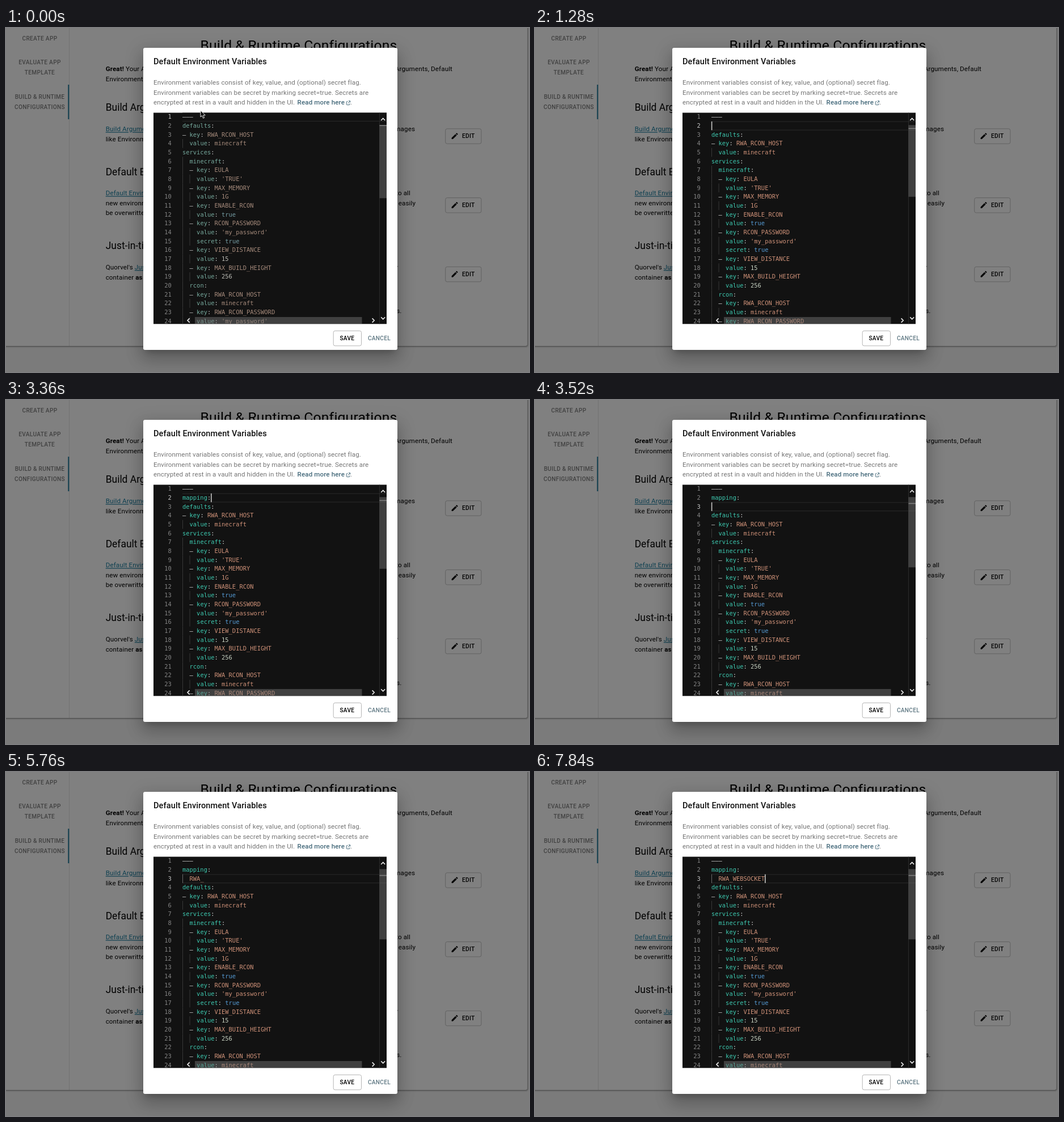
These frames come from a looping animation (922 px wide and 607 px high, 8000 ms). An HTML page:

```html
<!DOCTYPE html>
<html lang="en">
<head>
<meta charset="utf-8">
<title>Environment variables editor</title>
<style>
html, body { margin: 0; width: 100%; height: 100%; overflow: hidden; background: #7b7b7b; }
svg { display: block; width: 922px; height: 607px; }
text { font-family: Roboto, sans-serif; white-space: pre; }
.body { font-size: 11.62px; letter-spacing: .00938em; }
.btn { font-size: 10.17px; font-weight: 500; letter-spacing: .02857em; }
.h4 { font-size: 24.7px; letter-spacing: .00735em; }
.h5 { font-size: 17.43px; }
.h6 { font-size: 14.52px; font-weight: 500; letter-spacing: .0075em; }
.link { fill: #0c3f50; text-decoration: underline; }
.bold { font-weight: 700; }
.code text { font-family: "DejaVu Sans Mono", monospace; font-size: 10.43px; }
.mid { text-anchor: middle; }
.end { text-anchor: end; }
.plain { fill: #d4d4d4; } .key { fill: #3dc9b0; } .str { fill: #ce9178; }
.bool { fill: #569cd6; } .num { fill: #c8d2c2; }
.dim .plain { fill: #c6c6c6; } .dim .key { fill: #76a99d; } .dim .str { fill: #a58a7b; }
.dim .bool { fill: #769fa6; } .dim .num { fill: #bcbcb6; }
.shade rect { fill: #000; }
</style>
</head>
<body>
<svg viewBox="0 0 922 607">
  <defs>
    <clipPath id="pane"><rect x="260" y="149.4" width="411" height="372.8"/></clipPath>
    <filter id="near" x="-20%" y="-20%" width="140%" height="140%"><feGaussianBlur stdDeviation="5.4"/></filter>
    <filter id="far" x="-20%" y="-20%" width="140%" height="140%"><feGaussianBlur stdDeviation="15"/></filter>
    <filter id="thin" x="-5%" y="-5%" width="110%" height="110%"><feGaussianBlur stdDeviation="1"/></filter>
    <path id="pencil" transform="scale(.605)" d="M3 17.25V21h3.75L17.81 9.94l-3.75-3.75L3 17.25zM20.71 7.04a1 1 0 000-1.41l-2.34-2.34a1 1 0 00-1.41 0l-1.83 1.83 3.75 3.75 1.83-1.83z"/>
  </defs>
  <rect width="922" height="607" fill="#7b7b7b"/>
  <rect x="-9" y="-9" width="929" height="571.5" rx="3" fill="#4c4c4c" filter="url(#thin)"/>
  <rect x="-9" y="-9" width="928" height="570" rx="3" fill="#808080"/>
  <rect x="111" width="1" height="561" fill="#727272"/>
  <rect x="109.3" y="100" width="2" height="61" fill="#123f4f"/>
  <g id="page"></g>

  <g class="shade">
    <rect x="247" y="48" width="438" height="523" opacity=".2" filter="url(#near)"/>
    <rect x="240" y="50" width="452" height="537" opacity=".14" filter="url(#far)"/>
    <rect x="236" y="36" width="460" height="545" opacity=".12" filter="url(#far)"/>
  </g>
  <rect x="242" y="35" width="448" height="533" rx="3" fill="#fff"/>
  <g id="dialog"></g>
  <g fill="none" stroke="#44697a" stroke-width="1">
    <path d="M602.6 129.6H601.2a1 1 0 0 0-1 1V134.6a1 1 0 0 0 1 1h3.8a1 1 0 0 0 1-1v-1.4"/>
    <path d="M602.6 133.2l3.8-4M604 128.7h2.7v2.7"/>
  </g>
  <rect x="577.2" y="534.4" width="49.3" height="26.4" rx="3" fill="none" stroke="#b5b5b5"/>

  <g clip-path="url(#pane)">
    <rect x="260" y="149" width="411" height="374" fill="#121212"/>
    <g id="current" fill="#2a2a2a">
      <rect x="311" width="360" height="1"/><rect x="311" y="14.9" width="360" height="1"/>
    </g>
    <g id="code" class="code"></g>
    <rect id="caret" width="1.6" height="15.4" fill="#c8c8c6"/>
    <rect x="658" y="149" width="1" height="374" fill="#2b2b2b"/>
    <rect id="mark" x="658.5" width="13" height="1.5" fill="#8a8a8a"/>
    <g fill="#797979" opacity=".45">
      <rect id="slider" x="658.5" y="171.3" width="12.5"/>
      <rect x="333" y="510" width="294.5" height="12.4"/>
    </g>
    <g fill="none" stroke="#eee" stroke-width="1.6">
      <path d="M661.2 163l3.5-3.6 3.5 3.6M661.2 510.2l3.5 3.6 3.5-3.6M323.6 512.4l-3.6 3.6 3.6 3.6M645.6 512.4l3.6 3.6-3.6 3.6"/>
    </g>
  </g>
  <path id="mouse" transform="translate(343 145.6)" fill="#000" stroke="#fff" stroke-width=".9"
    d="M0 0V11.4l2.6-2.4 2 4.6 2-.9-2-4.4h3.6z"/>
</svg>
<script>
const LOOP = 8000, LEFT = 311, TOP = 149, ROW = 15.67, CHAR = 6.28;
const $ = id => document.getElementById(id);
const span = (cls, s) => `<tspan class="${cls}">${s}</tspan>`;
const text = (cls, x, y, s, fill = '#000') => `<text class="${cls}" x="${x}" y="${y}" fill="${fill}">${s}</text>`;

function drawPage() {
  const nav = [['CREATE APP', 21.6], ['EVALUATE APP', 64], ['TEMPLATE', 82], ['BUILD &amp; RUNTIME', 124.6], ['CONFIGURATIONS', 142.6]];
  const left = [
    [76.2, span('bold', 'Great!') + ' Your App'], [93.7, 'Environment'],
    [182.4, span('link', 'Build Arguments')], [199.9, 'like Environment'],
    [295.4, span('link', 'Default Environ')], [312.9, 'new environments'], [330.3, 'be overwritten'],
    [426.2, "Quorvel's " + span('link', 'Just-in')], [443.7, 'container ' + span('bold', 'as')]
  ];
  const right = [[787, 76.2, 'Arguments, Default'], [721, 182.4, 'images'], [713, 295.4, 'to all'],
    [722, 312.9, 'easily'], [691, 426.2, 'y'], [697.5, 502.6, 's.']];
  const heads = [[146.2, 'Build Arguments'], [259.6, 'Default Env'], [389.6, 'Just-in-time']];
  const edits = [177.8, 299.6, 421.4];
  $('page').innerHTML =
    text('h4 mid', 516, 39, 'Build &amp; Runtime Configurations') +
    nav.map(([s, y]) => text('btn mid', 59.5, y, s, '#414141')).join('') +
    left.map(([y, s]) => text('body', 175.7, y, s)).join('') +
    right.map(([x, y, s]) => text('body end', x, y, s)).join('') +
    heads.map(([y, s]) => text('h5', 175.7, y, s)).join('') +
    edits.map(y => `<rect x="774.7" y="${y}" width="63.2" height="26.4" rx="3" fill="none" stroke="#626262"/>
      <use href="#pencil" transform="translate(783.8 ${y + 5.6})"/>` + text('btn', 804, y + 16.6, 'EDIT')).join('');
}

function drawDialog() {
  const grey = '#757575', teal = '#44697a';
  $('dialog').innerHTML =
    text('h6', 260, 63.6, 'Default Environment Variables', '#111') +
    text('body', 260, 100.2, 'Environment variables consist of key, value, and (optional) secret flag.', grey) +
    text('body', 260, 117.6, 'Environment variables can be secret by marking secret=true. Secrets are', grey) +
    text('body', 260, 135, 'encrypted at rest in a vault and hidden in the UI.', grey) +
    `<text class="body" x="513.6" y="135" fill="${teal}" font-weight="500">Read more here</text>` +
    text('body', 607.2, 135, '.', grey) +
    text('btn mid', 601.4, 551.4, 'SAVE') +
    text('btn mid', 658, 551.4, 'CANCEL', '#5f7883');
}

const item = (key, value, pad = '  ') => [`${pad}- key: ${key}`, `${pad}  value: ${value}`];
const yaml = [
  'defaults:', ...item('RWA_RCON_HOST', 'minecraft', ''),
  'services:', '  minecraft:',
  ...item('EULA', "'TRUE'"), ...item('MAX_MEMORY', '1G'), ...item('ENABLE_RCON', 'true'),
  ...item('RCON_PASSWORD', "'my_password'"), '    secret: true',
  ...item('VIEW_DISTANCE', '15'), ...item('MAX_BUILD_HEIGHT', '256'),
  '  rcon:', ...item('RWA_RCON_HOST', 'minecraft'), ...item('RWA_RCON_PASSWORD', "'my_password'")
];

// the editor shows hyphens as wide as a whole cell
const wide = s => s.replace(/-/g, '\u2013');

function paint(line) {
  if (line === '---') return span('plain', wide(line));
  const [, pad, key, value] = line.match(/^([\s-]*)(?:(\w+):)?\s*(.*)$/);
  const kind = /^(true|false)$/.test(value) ? 'bool' : /^\d+$/.test(value) ? 'num' : 'str';
  return span('plain', wide(pad)) + (key ? span('key', key) + span('plain', value ? ': ' : ':') : '') + (value ? span(kind, value) : '');
}

// [time, characters present] for each typed word
const word1 = [...Array(8)].map((_, i) => [1920 + 160 * i, i + 1]);
const word2 = [[4800, 1], [4960, 2], [5120, 3], [5280, 4], [6240, 5], [6400, 6], [6720, 7], [6880, 8],
  [7360, 9], [7520, 10], [7680, 12], [7840, 13]];
const typed = (s, keys, t) => s.slice(0, keys.reduce((n, [at, len]) => t >= at ? len : n, 0));

function stateAt(t) {
  const row = t < 1280 ? 0 : t < 3520 ? 1 : 2;
  const first = typed('mapping:', word1, t);
  const name = typed('RWA_WEBSOCKET', word2, t);
  const second = t < 4320 ? '' : '  ' + name;
  const hidden = t < 1280 || (t >= 1600 && t < 1920) || (t >= 4000 && t < 4320) || (t >= 5760 && t < 6240);
  const head = ['---', first, second].slice(0, row + 1);
  return { row, head, hidden, guide: name !== '', col: head[row].length, mouse: t < 160 };
}

function drawCode({ row, head, guide }) {
  const lines = [...head, ...yaml].slice(0, 24);
  $('code').setAttribute('class', row ? 'code' : 'code dim');
  $('code').innerHTML = lines.map((line, i) => {
    const y = TOP + i * ROW, indent = line.search(/\S|$/);
    let out = text('end', 291.8, y + 11.3, i + 1, i === row ? '#c6c6c6' : '#858585');
    for (let c = 0; c < indent; c += 2) {
      if (i === row && !guide) break;
      out += `<rect x="${LEFT + c * CHAR}" y="${y}" width="1" height="${ROW}" fill="${i === row ? '#686868' : '#383838'}"/>`;
    }
    return out + text('', LEFT, y + 11.3, paint(line));
  }).join('');
}

function place(el, attrs) {
  for (const k in attrs) el.setAttribute(k, attrs[k]);
}

let shown = '';
function update(t) {
  const s = stateAt(t), id = JSON.stringify(s);
  if (id === shown) return;
  shown = id;
  drawCode(s);
  const y = TOP + s.row * ROW;
  place($('current'), { transform: `translate(0 ${y})` });
  place($('caret'), { x: LEFT + s.col * CHAR - .2, y: y + .2, visibility: s.hidden ? 'hidden' : 'visible' });
  place($('mark'), { y: 171.3 + s.row * 5.3 });
  place($('slider'), { height: 129 - s.row * 2.5 });
  place($('mouse'), { visibility: s.mouse ? 'visible' : 'hidden' });
}

drawPage();
drawDialog();
update(0);
const start = performance.now();
(function tick() {
  update((performance.now() - start) % LOOP);
  requestAnimationFrame(tick);
})();
</script>
</body>
</html>
```
